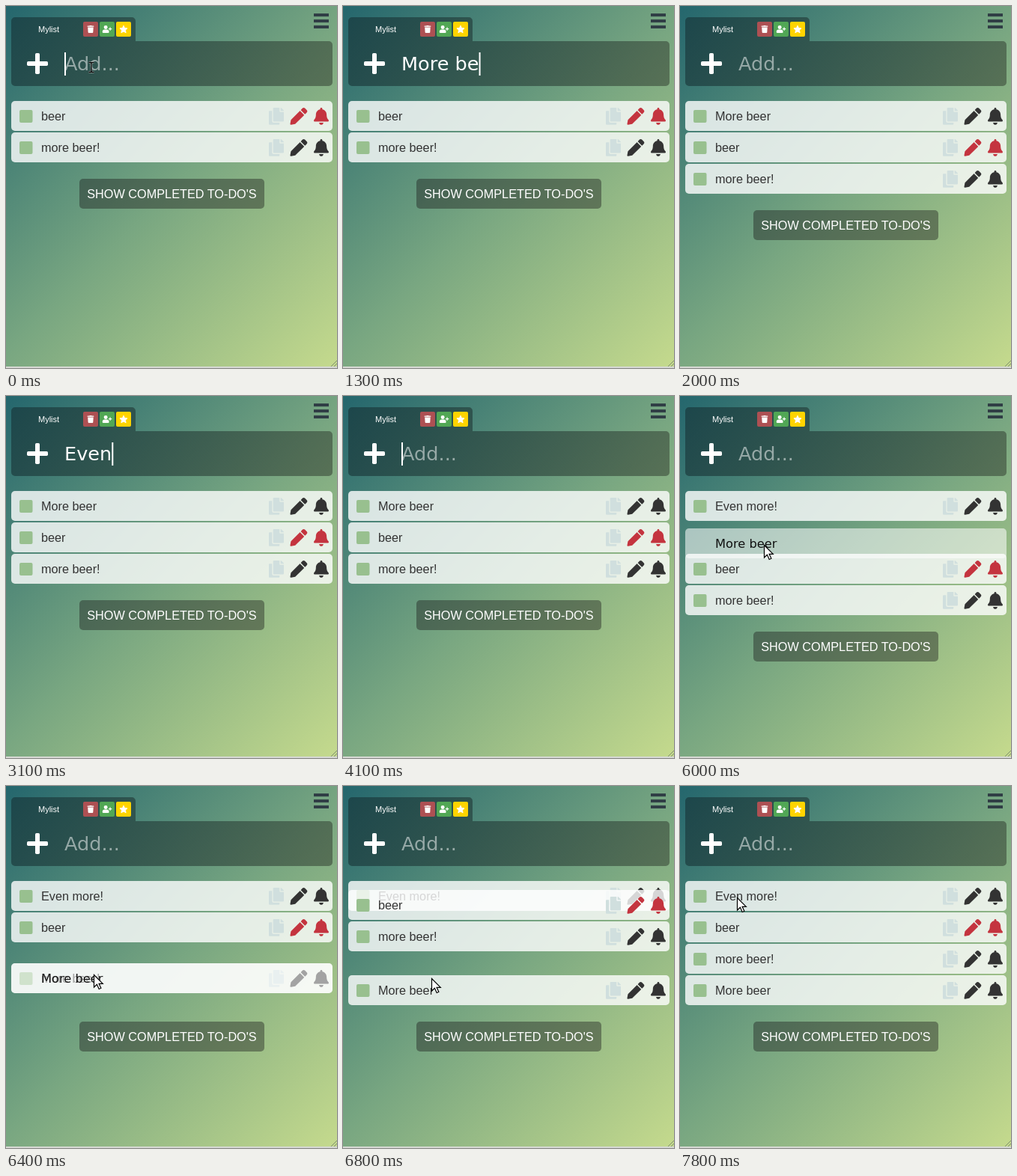
Write an HTML page that moves like this. It is 442 by 484 pixels and loops after 8 s.

```html
<!DOCTYPE html>
<html lang="en">
<head>
<meta charset="utf-8">
<title>To-do list</title>
<style>
  html, body { margin: 0; width: 100%; height: 100%; overflow: hidden; }
  body { background: linear-gradient(135deg, #24666d, #78a681 50%, #c5da8d); }
  svg { display: block; width: 442px; height: 484px; font: 16.25px "Liberation Sans", Arial, sans-serif; }
  .panel { fill: #1c1c1c; fill-opacity: .42; }
  .white { fill: #fff; }
  .row { fill: #333; }
  .row.alarm { --ink: #c4343f; }
  .row .ink { fill: var(--ink, #333); }
  .card { fill: #fff; fill-opacity: .8; }
  .check { fill: #98c08f; }
  .copy { fill: #d0dfde; }
  #field, #hint, #ghost text { font-family: "DejaVu Sans", sans-serif; white-space: pre; }
  #field, #hint { font-size: 25.6px; fill: #fff; }
  #hint { fill-opacity: .5; }
  #ghost text { fill: #111; }
  #ghost rect { fill: #fff; fill-opacity: .55; }
</style>
</head>
<body>
<svg viewBox="0 0 442 484">
  <defs>
    <linearGradient id="shade">
      <stop stop-color="#142c30" stop-opacity=".56"/>
      <stop offset="1" stop-color="#20261f" stop-opacity=".45"/>
    </linearGradient>
    <path id="bell" d="M224 512c35 0 64-29 64-64H160c0 35 29 64 64 64zm215-150c-19-21-55-52-55-154 0-78-54-140-128-155V32c0-18-14-32-32-32s-32 14-32 32v21C119 68 64 130 64 208c0 102-36 133-55 154-6 6-9 14-9 22 0 16 13 32 32 32h384c19 0 32-16 32-32 0-8-3-16-9-22z"/>
    <path id="pencil" d="M498 142l-46 46c-5 5-12 5-17 0L324 77c-5-5-5-12 0-17l46-46c19-19 49-19 68 0l60 60c19 19 19 49 0 68zM284 100L22 362 0 484c-3 16 11 31 28 28l122-22 262-262c5-5 5-12 0-17L301 100c-5-5-12-5-17 0z"/>
    <path id="copy" d="M320 448v40q0 24-24 24H24q-24 0-24-24V120q0-24 24-24h72v296q0 56 56 56zM320 104V0H152q-24 0-24 24v368q0 24 24 24h272q24 0 24-24V128H344q-24 0-24-24zM441 73L375 7q-7-7-17-7h-6v96h96v-6q0-10-7-17z"/>
    <path id="trash" d="M432 32H312l-9-19Q296 0 281 0H167q-15 0-22 13l-9 19H16Q0 32 0 48v32q0 16 16 16h416q16 0 16-16V48q0-16-16-16zM32 128l21 339q3 45 48 45h246q45 0 48-45l21-339z"/>
    <path id="person" d="M224 256a128 128 0 1 0 0-256 128 128 0 0 0 0 256zm90 32H134C60 288 0 348 0 422v42q0 48 48 48h352q48 0 48-48v-42c0-74-60-134-134-134zM496 128h64v80h80v64h-80v80h-64v-80h-80v-64h80z"/>
    <path id="beamShape" d="M-3.5-6.5h2.5q1 0 1 1v11q0 1-1 1h-2.5M3.5-6.5h-2.5q-1 0-1 1v11q0 1 1 1h2.5"/>
  </defs>

  <path d="M7 47V20a5 5 0 0 1 5-5H168a5 5 0 0 1 5 5V47H431a5 5 0 0 1 5 5V102a5 5 0 0 1-5 5H12a5 5 0 0 1-5-5z" fill="url(#shade)"/>
  <text x="43" y="35" font-size="11" class="white">Mylist</text>
  <rect x="103" y="21" width="20" height="20" rx="2" fill="#ad5053"/>
  <rect x="125" y="21" width="20" height="20" rx="2" fill="#51a755"/>
  <rect x="147" y="21" width="20" height="20" rx="2" fill="#ffd400"/>
  <g class="white">
    <use href="#trash" transform="translate(108.6 26) scale(.0195)"/>
    <use href="#person" transform="translate(128.8 26) scale(.0195)"/>
    <path id="star" stroke="#fff" stroke-linejoin="round"/>
    <rect x="39" y="63" width="6" height="28" rx="1.8"/>
    <rect x="28" y="74" width="28" height="6" rx="1.8"/>
  </g>
  <path d="M411 12h20m-20 8h20m-20 8h20" stroke="#303e45" stroke-width="4"/>
  <text id="hint" x="78" y="86">Add...</text>
  <text id="field" x="78" y="86"></text>
  <rect id="caret" y="62" width="2" height="31" class="white"/>

  <g id="rows"></g>
  <g id="button">
    <rect x="98" width="247" height="40" rx="5" class="panel"/>
    <text x="221.5" y="26" text-anchor="middle" class="white">SHOW COMPLETED TO-DO'S</text>
  </g>
  <g id="ghost">
    <rect x="7" width="429" height="40" rx="5"/>
    <text x="47" y="26">More beer</text>
  </g>

  <path d="M434 482l8-8m-4 8l4-4" stroke="#7f8f6c" fill="none"/>
  <rect y="482" width="442" height="2" fill="#d5d8d2"/>
  <g id="beam" fill="none">
    <use href="#beamShape" stroke="#fff" stroke-opacity=".6" stroke-width="2.4"/>
    <use href="#beamShape" stroke="#000" stroke-width="1.4"/>
  </g>
  <path id="arrow" d="M.5.5v16.5l3.9-3.7 2.8 6.2 2.7-1.2-2.8-6h5.2z" fill="#fff" stroke="#000" stroke-width="1.2"/>
</svg>
<script>
const LOOP = 8000, STEP = 100;
const TOP = 127, PITCH = 42;
const ADDED = [1900, 4200];
const GRAB = 5800, DROP = 6600;

const el = id => document.getElementById(id);
const ramp = (t, start, length) => Math.min(1, Math.max(0, (t - start) / length));
const between = (t, start, end) => t >= start && t < end;
const mix = (a, b, u) => a + (b - a) * u;

el('star').setAttribute('d', 'M' + Array.from({ length: 10 }, (_, i) => {
  const r = i % 2 ? 2.5 : 5.3, a = i * Math.PI / 5;
  return `${157 + r * Math.sin(a)} ${31.5 - r * Math.cos(a)}`;
}).join('L') + 'z');

const icon = (name, x, cls) =>
  `<use href="#${name}" class="${cls}" transform="translate(${x} 9) scale(.0446)"/>`;

const addedBy = t => ADDED.filter(time => time <= t).length;

// Share of the drag done: slow start, quick middle.
const dragged = t => (1 - Math.cos(Math.PI * ramp(t, GRAB, DROP - GRAB) ** 1.15)) / 2;

// Old rows make way for the dragged one, then jump up a slot and settle after the drop.
function oldSlot(index, t) {
  const lift = t < DROP ? ramp(t, 6100 + 200 * index, 260) : 2 - ramp(t, 6700, 350);
  return index + addedBy(t) - lift;
}

// Each slot is a position in the list, or null while the row is absent.
const rows = [
  { label: 'Even more!', slot: t => addedBy(t) > 1 ? 0 : null },
  { label: 'More beer', slot: t => !addedBy(t) || between(t, GRAB, DROP) ? null : t < GRAB ? addedBy(t) - 1 : 3 },
  { label: 'beer', alarm: true, slot: t => oldSlot(0, t) },
  { label: 'more beer!', slot: t => oldSlot(1, t) }
];

// Bursts of typing, one character per step.
const entries = [
  { sent: 1800, bursts: [[700, 'More '], [1200, 'beer']] },
  { sent: 4100, bursts: [[2700, 'E'], [2900, 'ven'], [3300, ' m'], [3600, 'ore'], [4000, '!']] }
];

// Key points of the free pointer: time, x, y.
const pointerPath = [
  [4900, 124, 104], [5300, 111, 183], [7000, 118, 257], [7200, 78, 149],
  [7400, 78, 149], [7500, 66, 174], [7600, 66, 174], [7800, 76, 149]
];

el('rows').innerHTML = rows.map(({ label, alarm }) => `
  <g class="row ${alarm ? 'alarm' : ''}">
    <rect x="7" width="429" height="40" rx="5" class="card"/>
    <rect x="18" y="12" width="17.5" height="17" rx="2" class="check"/>
    <text x="47" y="26">${label}</text>
    ${icon('copy', 351, 'copy')}${icon('pencil', 379.5, 'ink')}${icon('bell', 411, 'ink')}
  </g>`).join('');
rows.forEach((row, i) => row.node = el('rows').children[i]);

function show(node, on) {
  node.style.display = on ? '' : 'none';
}

function place(node, on, x, y) {
  show(node, on);
  node.setAttribute('transform', `translate(${Math.round(x)} ${Math.round(y)})`);
}

function typed(t) {
  const entry = entries.find(e => t < e.sent);
  if (!entry) return '';
  return entry.bursts.map(([start, text]) => text.slice(0, Math.max(0, (t - start) / STEP + 1))).join('');
}

function pointer(t) {
  if (between(t, 5400, GRAB)) return [111, 183];
  if (between(t, GRAB, 7000)) return [mix(111, 118, dragged(t)), Math.min(257, mix(192, 266, dragged(t)))];
  const next = pointerPath.findIndex(point => point[0] > t);
  if (next < 1) return pointerPath.at(next).slice(1);
  const [from, x0, y0] = pointerPath[next - 1], [to, x1, y1] = pointerPath[next];
  const u = ramp(t, from, to - from);
  return [mix(x0, x1, u), mix(y0, y1, u)];
}

function draw(t) {
  const text = typed(t);
  const field = el('field');
  field.textContent = text;
  show(el('hint'), !text);
  show(el('caret'), t < 2000 || between(t, 2700, 4600));
  el('caret').setAttribute('x', 78 + (text ? field.getComputedTextLength() : 0));

  for (const { node, slot } of rows) {
    const s = slot(t);
    place(node, s !== null, 0, TOP + PITCH * s);
  }
  place(el('button'), true, 0, 231 + PITCH * addedBy(t));
  place(el('ghost'), between(t, GRAB, DROP), 0, mix(169, 252, dragged(t)));

  place(el('beam'), t < 700 || between(t, 4500, 4900), mix(114, 120, ramp(t, 700, 1)), 82);
  place(el('arrow'), t >= 4900, ...pointer(t));
}

function tick() {
  const t = performance.now() % LOOP;
  draw(t - t % STEP);
  requestAnimationFrame(tick);
}
tick();
</script>
</body>
</html>
```
